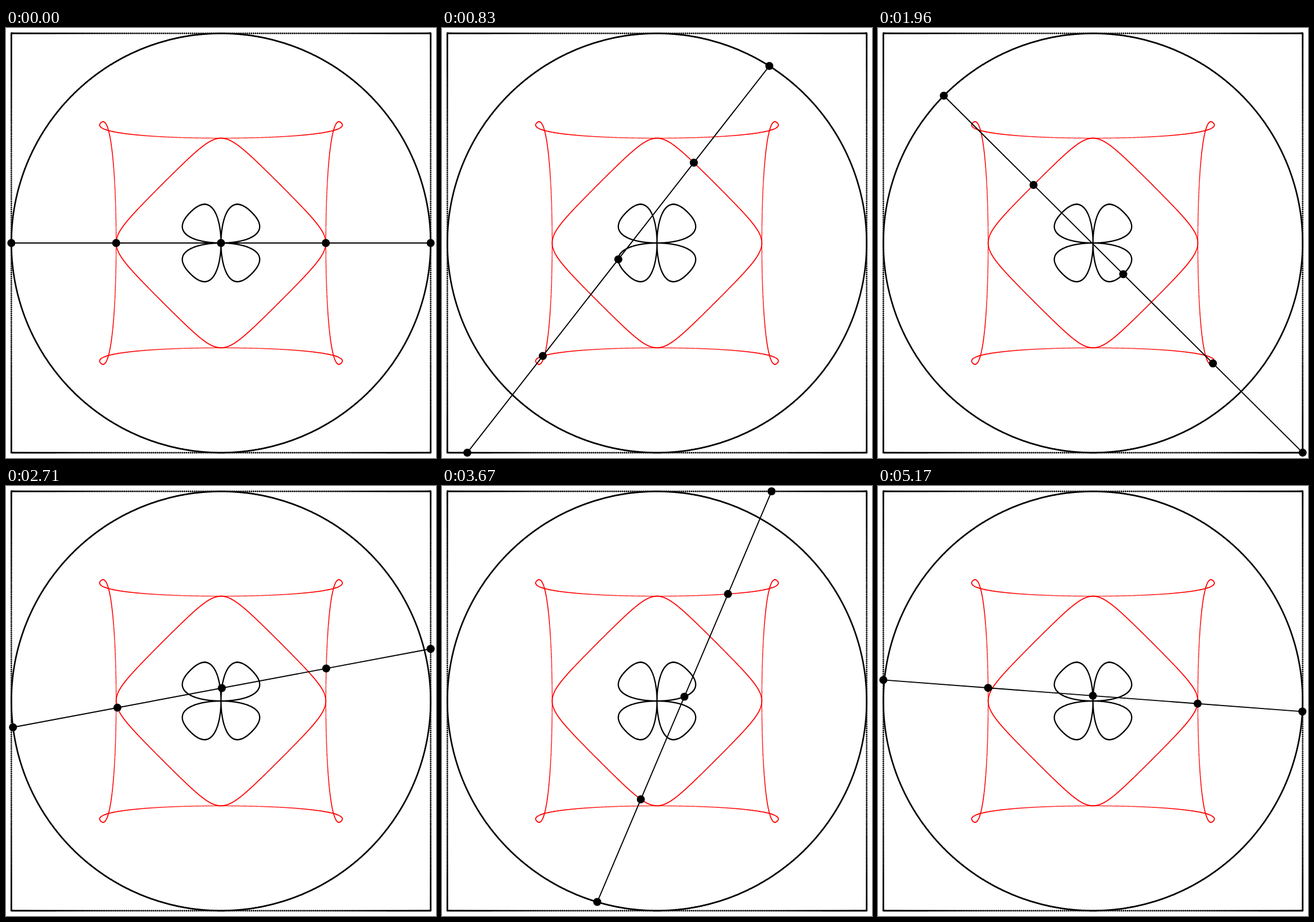
An HTML page that plays this animation: 748x748 px, repeating every 5.21 s.

```html
<!DOCTYPE html>
<html lang="en">
<head>
<meta charset="utf-8">
<title>Circle and square linkage</title>
<style>
  html, body { margin: 0; width: 100%; height: 100%; overflow: hidden; background: #fff; }
  svg { display: block; width: 100vw; height: 100vh; }
  path { fill: none; stroke-linecap: round; }
</style>
</head>
<body>
<svg id="stage" viewBox="0 0 748 748"></svg>
<script>
const CENTER = 374, RADIUS = 364.7;
const STEPS = 125, LOOP_MS = 5210, SAMPLES = 1250;
const MARKS = [0, 0.25, 0.5, 0.75, 1];
const stage = document.getElementById('stage');

function add(tag, attributes) {
  const node = document.createElementNS('http://www.w3.org/2000/svg', tag);
  for (const name in attributes) node.setAttribute(name, attributes[name]);
  return stage.appendChild(node);
}

// The far end of the rod runs along the square, easing into each corner.
function squarePoint(angle) {
  const c = Math.cos(angle), s = Math.sin(angle), slide = Math.sin(2 * angle);
  return Math.abs(c) >= Math.abs(s)
    ? [-Math.sign(c), -Math.sign(c) * slide]
    : [-Math.sign(s) * slide, -Math.sign(s)];
}

// Point on the rod: mark 0 is on the circle, mark 1 on the square.
function rodPoint(angle, mark) {
  const [sx, sy] = squarePoint(angle);
  const x = Math.cos(angle) * (1 - mark) + sx * mark;
  const y = Math.sin(angle) * (1 - mark) + sy * mark;
  return [CENTER + RADIUS * x, CENTER - RADIUS * y];
}

// Each curve is a trail of round dots, evenly spaced in angle.
function drawTrail(mark, color, width) {
  let d = '';
  for (let i = 0; i < SAMPLES; i++) {
    const [x, y] = rodPoint(2 * Math.PI * i / SAMPLES, mark);
    d += `M${x.toFixed(2)} ${y.toFixed(2)}h0`;
  }
  add('path', { d, stroke: color, 'stroke-width': width });
}

drawTrail(0, '#000', 3);
drawTrail(1, '#000', 3);
drawTrail(0.5, '#000', 2.4);
drawTrail(0.25, '#f00', 1.9);
drawTrail(0.75, '#f00', 1.9);

const rod = add('line', { stroke: '#000', 'stroke-width': 1.9 });
const joints = MARKS.map(() => add('circle', { r: 7 }));

// Steps run at 24 per second, with start times rounded to 10 ms.
const stepStart = step => Math.round(step * 25 / 6) * 10;

function render(time) {
  const t = time % LOOP_MS;
  let step = Math.min(STEPS - 1, Math.floor(t * 0.024) + 1);
  while (stepStart(step) > t) step--;
  const points = MARKS.map(mark => rodPoint(2 * Math.PI * step / STEPS, mark));
  points.forEach(([x, y], i) => {
    joints[i].setAttribute('cx', x);
    joints[i].setAttribute('cy', y);
  });
  const [x1, y1] = points[0], [x2, y2] = points[MARKS.length - 1];
  Object.entries({ x1, y1, x2, y2 }).forEach(([name, value]) => rod.setAttribute(name, value));
}

const start = performance.now();
function tick() {
  render(performance.now() - start);
  requestAnimationFrame(tick);
}
tick();
</script>
</body>
</html>
```
